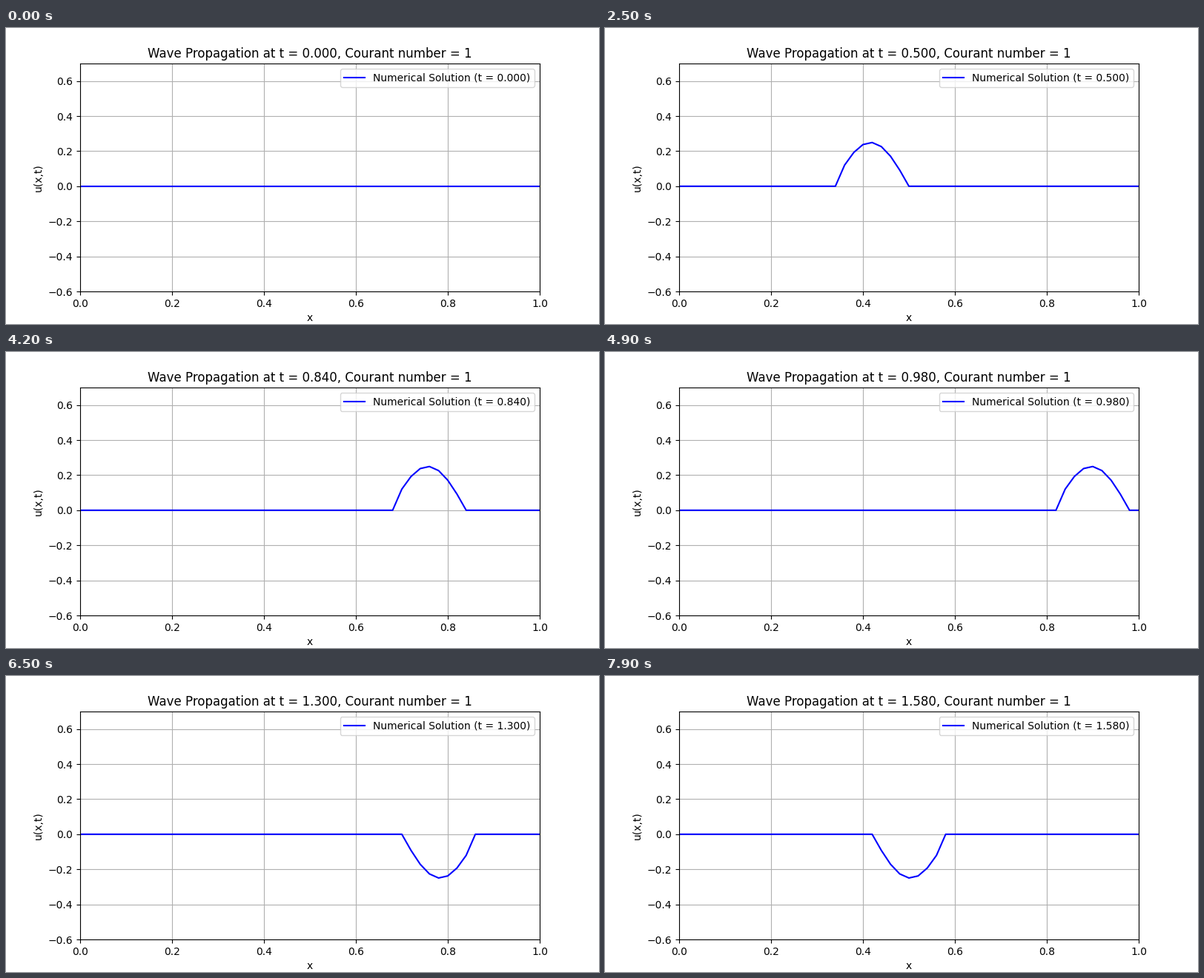
A matplotlib script that plays this animation: 800x400 px, repeating every 8 s.

```python
import numpy as np
import matplotlib.pyplot as plt
from matplotlib.animation import FuncAnimation

CELLS = 50
STEP = 1 / CELLS      # dx = dt, so the Courant number is 1
FRAMES = 80
PULSE_STEPS = 8       # the left end is driven for this many steps

nodes = np.arange(CELLS + 1)


def pulse(n):
    """Displacement of the driven end, n steps after the start."""
    driven = (n > 0) & (n < PULSE_STEPS)
    return np.where(driven, 0.25 * np.sin(6 * np.pi * n * STEP), 0.0)


def wave(n):
    """Right-going pulse plus its inverted reflection from the fixed end x = 1."""
    return pulse(n - nodes) - pulse(n - 2 * CELLS + nodes)


fig, ax = plt.subplots(figsize=(8, 4), dpi=100)
line, = ax.plot(nodes * STEP, wave(0), "b-",
                label="Numerical Solution (t = 0.000)")
ax.set_xlim(0, 1)
ax.set_ylim(-0.6, 0.7)
ax.set_xlabel("x")
ax.set_ylabel("u(x,t)")
ax.grid(True)
title = ax.set_title("")
label = ax.legend(loc="upper right").get_texts()[0]


def update(n):
    t = n * STEP
    line.set_ydata(wave(n))
    title.set_text(f"Wave Propagation at t = {t:.3f}, Courant number = 1")
    label.set_text(f"Numerical Solution (t = {t:.3f})")
    return line, title, label


anim = FuncAnimation(fig, update, frames=FRAMES, interval=100,
                     repeat=True, repeat_delay=0)
plt.show()
```
